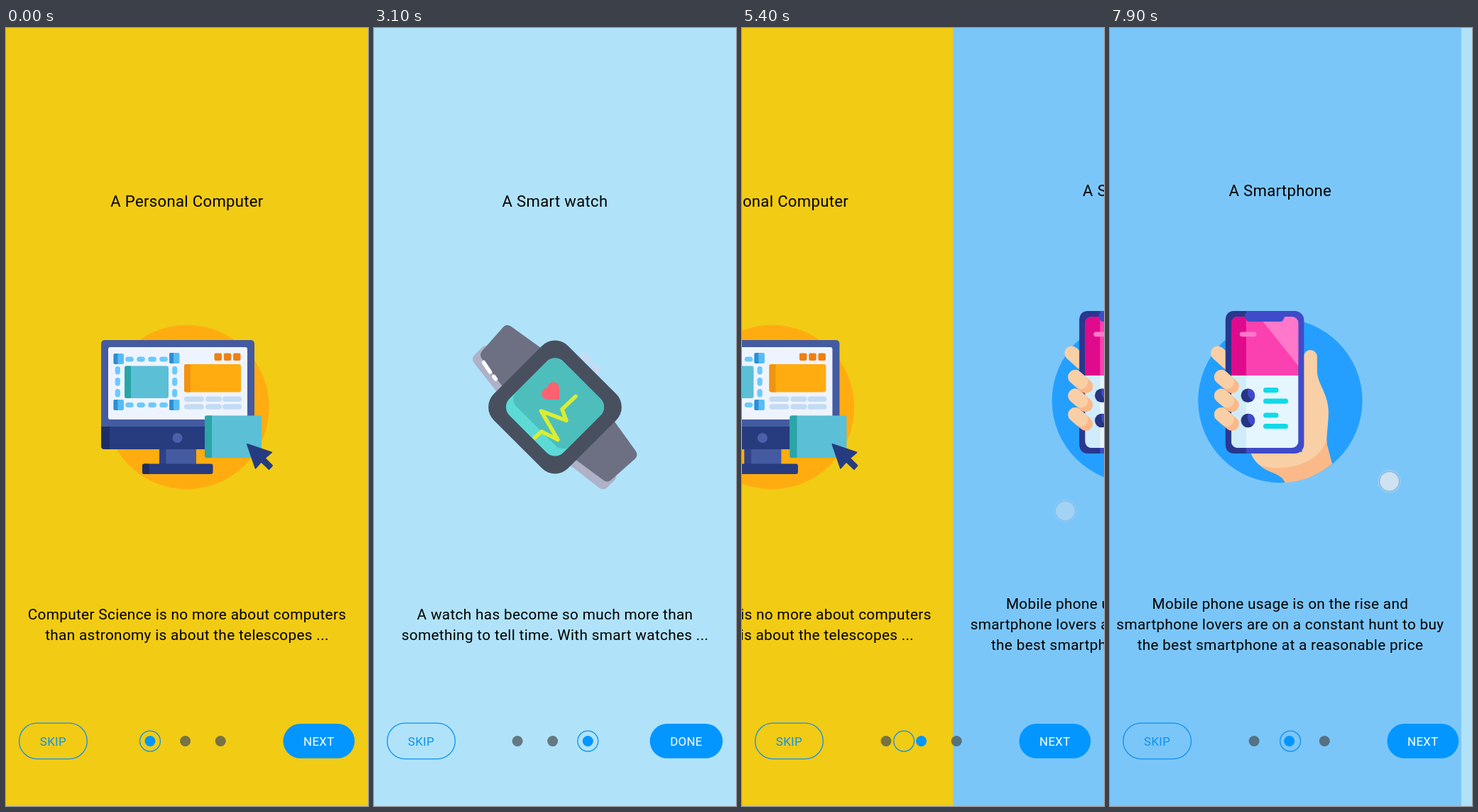
These frames come from a looping animation (510x1097 px, 8 s). An HTML page:

```html
<!DOCTYPE html>
<html lang="en">
<head>
<meta charset="utf-8">
<title>Onboarding pages</title>
<style>
  html, body { margin: 0; width: 100%; height: 100%; overflow: hidden; }
  svg { display: block; width: 100vw; height: 100vh; }
  text { font-family: Roboto, sans-serif; text-anchor: middle; letter-spacing: .325px; }
  .title { font-size: 22.08px; }
  .body { font-size: 20.78px; }
  .label { font-size: 16.88px; }
</style>
</head>
<body>
<svg viewBox="0 0 510 1097" preserveAspectRatio="none">
  <defs>
    <clipPath id="phoneScreen"><rect x="186" y="407" width="94.5" height="185" rx="9"/></clipPath>
    <clipPath id="watchScreen"><rect x="-53.8" y="-53.8" width="107.6" height="107.6" rx="17"/></clipPath>
    <g id="handle">
      <rect width="14.5" height="15" rx="2" fill="#56bdf4"/>
      <path d="M2 0H6V15H2Q0 15 0 13V2Q0 0 2 0Z" fill="#2f8fd3"/>
    </g>
    <g id="finger" fill="none" stroke-width="20" stroke-linecap="round">
      <path d="M0 0L15 13" stroke="#fbb98a"/>
      <path d="M0 0L8 7" stroke="#f9cfa6"/>
    </g>
    <g id="contact">
      <circle cx="209.5" cy="0" r="9.8" fill="#263484"/>
      <path d="M209.5 -9.8A9.8 9.8 0 0 1 216.4 6.9Q207 2 209.5 -9.8Z" fill="#3f4bc8"/>
      <path d="M234.7 -7.5H249M234.7 8H262.5" stroke="#12d9e8" stroke-width="7.2" stroke-linecap="round"/>
    </g>
    <g id="strap" stroke-width="16" stroke-linejoin="round">
      <path d="M158 456L192 506L183 513L147 467Z" fill="#aeb1c8" stroke="#aeb1c8"/>
      <path d="M188 427L238 463L192 507L158 461Z" fill="#6d7083" stroke="#6d7083"/>
    </g>
  </defs>

  <g class="page">
    <rect width="510.5" height="1097" fill="#f2cb14"/>
    <circle cx="255" cy="534.5" r="115.7" fill="#ffac11"/>
    <rect x="216" y="592" width="52" height="24" fill="#445ba1"/>
    <rect x="216" y="592" width="9.5" height="24" fill="#2f4288"/>
    <rect x="192" y="614.5" width="99.5" height="14.5" rx="3" fill="#273b7f"/>
    <path d="M195 614.5H201.5V629H195Q192 629 192 626V617.5Q192 614.5 195 614.5Z" fill="#1c2c5f"/>
    <rect x="134" y="440" width="216" height="154" rx="5" fill="#445ba1"/>
    <path d="M134 562H350V589Q350 594 345 594H139Q134 594 134 589Z" fill="#273b7f"/>
    <path d="M134 562H146V594H139Q134 594 134 589Z" fill="#1d2e66"/>
    <circle cx="241.5" cy="578" r="7" fill="#4a60a8"/>
    <rect x="144" y="450" width="196" height="102" rx="3" fill="#eef4ff"/>
    <g id="dashes" stroke="#6cc9fb" stroke-width="7.2" stroke-linecap="round"></g>
    <use href="#handle" x="151.5" y="459"/>
    <use href="#handle" x="230" y="458"/>
    <use href="#handle" x="151.5" y="524"/>
    <use href="#handle" x="230" y="524"/>
    <rect x="167" y="476.5" width="62" height="45.5" rx="3" fill="#5bbfd6"/>
    <path d="M170 476.5H176V522H170Q167 522 167 519V479.5Q167 476.5 170 476.5Z" fill="#2aa5a8"/>
    <g fill="#ee8012">
      <rect x="293.5" y="458.5" width="10.5" height="10.5" rx="2"/>
      <rect x="306.8" y="458.5" width="10.5" height="10.5" rx="2"/>
      <rect x="320" y="458.5" width="10.5" height="10.5" rx="2"/>
    </g>
    <rect x="251" y="474" width="80" height="39.5" rx="3" fill="#ffac11"/>
    <path d="M254 474H260V513.5H254Q251 513.5 251 510.5V477Q251 474 254 474Z" fill="#f0930f"/>
    <path d="M254.7 523.3H275.3M284.7 523.3H300.3M308.7 523.3H328.3M254.7 534H275.3M284.7 534H300.3M308.7 534H328.3"
      stroke="#c3dbf3" stroke-width="7.4" stroke-linecap="round"/>
    <rect x="280" y="546.5" width="80" height="59.5" rx="2.5" fill="#5bbfd6"/>
    <path d="M282.5 546.5H290V606H282.5Q280 606 280 603.5V549Q280 546.5 282.5 546.5Z" fill="#2aa5a8"/>
    <path d="M340 587L374 598.5L364.5 606.5L375 617L370.5 622L359.5 611.5L351.5 620.5Z"
      fill="#263c80" stroke="#263c80" stroke-width="2" stroke-linejoin="round"/>
    <text class="title" x="255" y="252">A Personal Computer</text>
    <text class="body" x="255" y="833.5">Computer Science is no more about computers</text>
    <text class="body" x="255" y="862.5">than astronomy is about the telescopes ...</text>
  </g>

  <g class="page">
    <rect width="510.5" height="1097" fill="#7bc6f9"/>
    <circle cx="255" cy="525.5" r="115.7" fill="#259fff"/>
    <path d="M286 463.5H288A9.5 9.5 0 0 1 307 463.5V485C308 502 322 515 323 540C323 560 319 583 321 588L328 614.5A115.7 115.7 0 0 1 262 641C256 627 240 628 228 618C220 612 216 606 213 598H286Z" fill="#f9cfa6"/>
    <path d="M228 617C262 627 310 615 320.5 580L321 588L328 614.5A115.7 115.7 0 0 1 262 641C256 627 240 628 228 618Z" fill="#fbb98a"/>
    <path d="M167 458.5L182 472" stroke="#f9cfa6" stroke-width="20" stroke-linecap="round"/>
    <rect x="178" y="399" width="110.5" height="201" rx="13" fill="#3f4bc8"/>
    <path d="M191 399H207V600H191Q178 600 178 587V412Q178 399 191 399Z" fill="#2a378f"/>
    <g clip-path="url(#phoneScreen)">
      <rect x="186" y="407" width="95" height="83" fill="#fb41b0"/>
      <path d="M225 407H281V477Z" fill="#ff78ca"/>
      <rect x="186" y="407" width="21" height="83" fill="#e00a8c"/>
      <rect x="186" y="490" width="95" height="102" fill="#e5f6ff"/>
      <rect x="186" y="490" width="21" height="102" fill="#d0ebfa"/>
    </g>
    <path d="M205 403H268V407H263Q260.5 407 260 410Q259 414 255 414H212Q207 414 206 409Z" fill="#3f4bc8"/>
    <path d="M201.3 431.8H218.2" stroke="#ff78ca" stroke-width="6.8" stroke-linecap="round"/>
    <use href="#contact" y="518.2"/>
    <use href="#contact" y="553.5"/>
    <use href="#finger" x="172" y="492"/>
    <use href="#finger" x="172" y="518.5"/>
    <use href="#finger" x="172" y="545"/>
    <text class="title" x="255" y="237">A Smartphone</text>
    <text class="body" x="255" y="818.5">Mobile phone usage is on the rise and</text>
    <text class="body" x="255" y="847.5">smartphone lovers are on a constant hunt to buy</text>
    <text class="body" x="255" y="876.5">the best smartphone at a reasonable price</text>
  </g>

  <g class="page">
    <rect width="510.5" height="1097" fill="#b0e3fa"/>
    <use href="#strap"/>
    <use href="#strap" transform="matrix(0 -1 -1 0 789.5 789.5)"/>
    <path d="M154.5 471.5L163.5 485M169 491.5L171.5 495" stroke="#fff" stroke-width="5.5" stroke-linecap="round"/>
    <path d="M295 461.5L302 469M310.5 478L314.5 482" stroke="#c9d8f3" stroke-width="8" stroke-linecap="round"/>
    <g transform="translate(255 534.5) rotate(45)">
      <rect x="-74" y="-74" width="148" height="148" rx="26" fill="#48505f"/>
      <g clip-path="url(#watchScreen)">
        <rect x="-54" y="-54" width="108" height="108" fill="#5cdad6"/>
        <rect x="-54" y="-70" width="108" height="108" rx="15" fill="#4ebebd"/>
      </g>
    </g>
    <g fill="#fd6270">
      <rect x="244.4" y="507.4" width="16.6" height="16.6" rx="1"/>
      <circle cx="244.6" cy="515.7" r="8.3"/>
      <circle cx="252.7" cy="507.6" r="8.3"/>
    </g>
    <path d="M226.5 577.5L236 569L259 580.5L235.5 540L271 553.5L265 537.5L284 519.5"
      fill="none" stroke="#dbed2f" stroke-width="5.5" stroke-linejoin="round" stroke-linecap="round"/>
    <text class="title" x="255" y="252">A Smart watch</text>
    <text class="body" x="255" y="833.5">A watch has become so much more than</text>
    <text class="body" x="255" y="862.5">something to tell time. With smart watches ...</text>
  </g>

  <rect x="18.6" y="980.2" width="95.7" height="50.4" rx="25.2" fill="none" stroke="#0d90ee" stroke-width="1.3"/>
  <text class="label" x="66.4" y="1012" fill="#0a93f5">SKIP</text>
  <g id="dots">
    <circle class="dot" cx="203" cy="1005.5" r="7.5"/>
    <circle class="dot" cx="252.6" cy="1005.5" r="7.5"/>
    <circle class="dot" cx="302.2" cy="1005.5" r="7.5"/>
    <circle id="ring" cy="1005.5" r="14.4" fill="none" stroke="#0d90ee" stroke-width="1.3"/>
  </g>
  <rect id="button" y="981" height="48.8" rx="24.4" fill="#0396ff"/>
  <text id="action" class="label" y="1012" fill="#fff"></text>
  <g id="touch">
    <circle r="16.5" fill="#fff" opacity=".13"/>
    <circle r="13.7" fill="#f8efee" fill-opacity=".62" stroke="#667" stroke-opacity=".28" stroke-width="1.2"/>
  </g>
</svg>
<script>
  const LOOP = 8000, WIDTH = 510, GAP = 49.6;
  const DRAG = 200, FLING = 450, FADE = 150, PULL = 0.25;
  const PAGE_EASE = 3, RING_EASE = 2, SELECT_LAG = 40;

  // Finger swipes: start time, pages, and where the finger lands.
  const swipes = [
    { at: 949, from: 0, to: 1, x: 448, y: 646 },
    { at: 2351, from: 1, to: 2, x: 425, y: 645 },
    { at: 3851, from: 2, to: 1, x: 290, y: 635 },
    { at: 5121, from: 1, to: 0, x: 310, y: 631 },
    { at: 6506, from: 0, to: 1, x: 420, y: 667 },
    { at: 7832, from: 1, to: 2, x: 415, y: 622 }
  ];

  const $ = id => document.getElementById(id);
  const pages = document.querySelectorAll('.page');
  const dots = document.querySelectorAll('.dot');
  const clamp = v => Math.min(1, Math.max(0, v));
  const lastSwipe = t => swipes.filter(s => s.at <= t).pop();

  // A drag that gathers speed, then a fling that eases out.
  function progress(ms, ease) {
    const drag = clamp(ms / DRAG), fling = clamp((ms - DRAG) / FLING);
    return PULL * drag * drag + (1 - PULL) * (1 - (1 - fling) ** ease);
  }

  function pageAt(t, ease) {
    const s = lastSwipe(t);
    return s ? s.from + (s.to - s.from) * progress(t - s.at, ease) : 0;
  }

  function drawTouch(t) {
    const s = lastSwipe(t);
    const ms = s ? t - s.at : Infinity;
    const alpha = clamp(1 - (ms - DRAG) / FADE);
    $('touch').setAttribute('opacity', alpha);
    if (!alpha) return;
    const u = clamp(ms / DRAG);
    const x = s.x + (s.from - s.to) * (PULL * u * u * WIDTH + 18 * u);
    $('touch').setAttribute('transform', `translate(${x} ${s.y + 50 * u})`);
  }

  function draw(t) {
    const p = pageAt(t, PAGE_EASE);
    pages.forEach((g, i) => g.setAttribute('transform', `translate(${(i - p) * WIDTH} 0)`));

    const selected = Math.round(pageAt(t - SELECT_LAG, PAGE_EASE));
    const last = selected === 2;
    dots.forEach((d, i) => d.setAttribute('fill', i === selected ? '#0396ff' : 'rgba(70,80,84,.72)'));
    $('dots').setAttribute('transform', `translate(${last ? -0.9 : 0} 0)`);
    $('ring').setAttribute('cx', 203 + GAP * pageAt(t, RING_EASE));

    const left = last ? 388.7 : 390.5;
    $('button').setAttribute('x', left);
    $('button').setAttribute('width', 491.2 - left);
    $('action').setAttribute('x', (left + 491.2) / 2);
    $('action').textContent = last ? 'DONE' : 'NEXT';
    drawTouch(t);
  }

  function addDashes() {
    const path = document.createElementNS('http://www.w3.org/2000/svg', 'path');
    let d = '';
    for (let i = 0; i < 4; i++)
      for (const y of [467, 531.5]) d += `M${171.8 + i * 16} ${y}h4.5`;
    for (let i = 0; i < 3; i++)
      for (const x of [157.3, 237.7]) d += `M${x} ${480.6 + i * 16}v4.3`;
    path.setAttribute('d', d);
    $('dashes').append(path);
  }

  function tick() {
    draw(performance.now() % LOOP);
    requestAnimationFrame(tick);
  }

  addDashes();
  tick();
</script>
</body>
</html>
```
